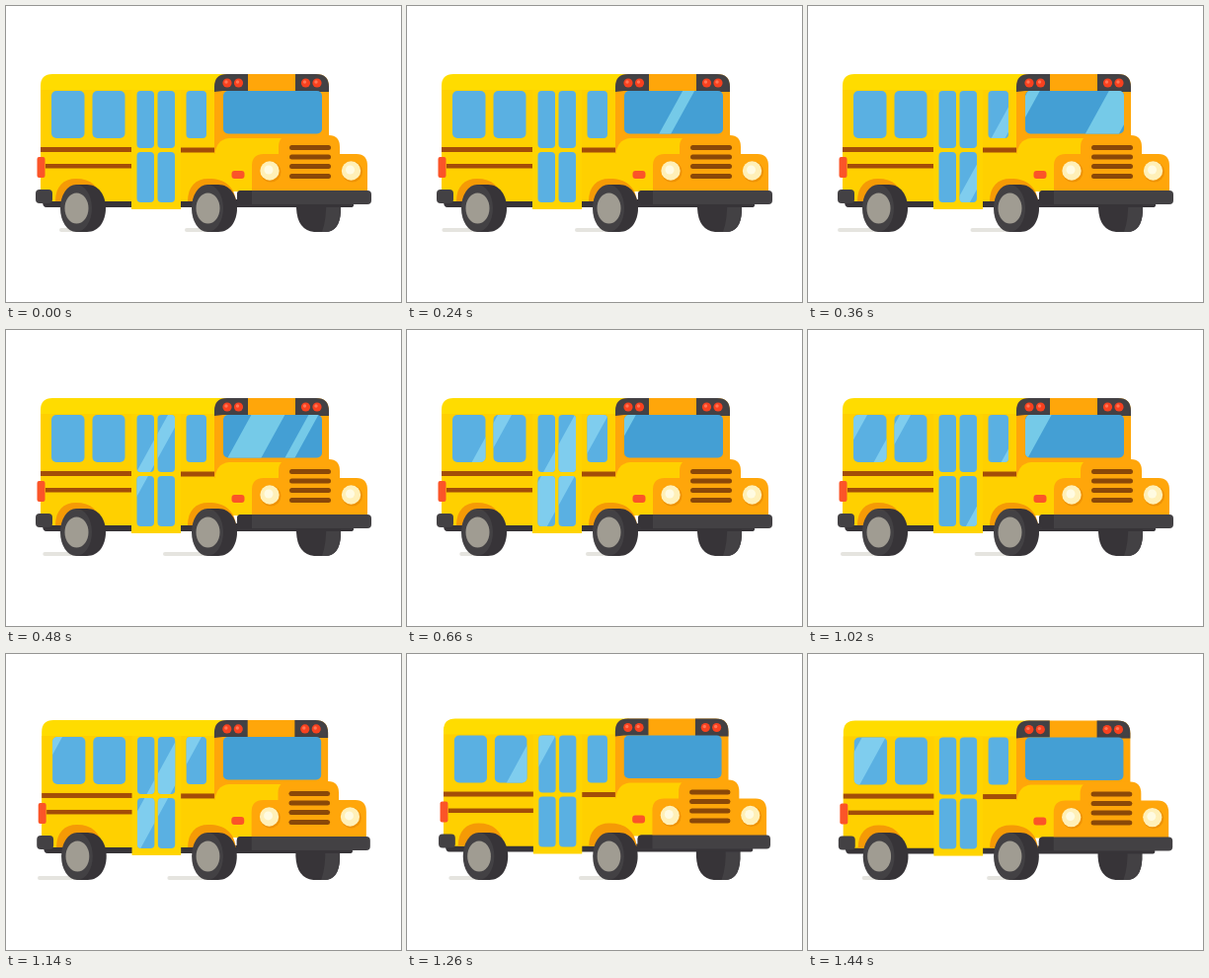
An HTML page for the animation above (1500 ms loop, 400 by 300 pixels).

```html
<!DOCTYPE html>
<html lang="en">
<head>
<meta charset="utf-8">
<title>School bus</title>
<style>
  html, body { margin: 0; width: 100%; height: 100%; overflow: hidden; background: #fff; }
  svg { display: block; width: 100%; height: 100%; }
  .dark { fill: #434144; }
  .deep { fill: #373438; }
  .brown { fill: #a34d08; }
  .red { fill: #f8411f; }
  .signal { fill: #fb5428; }
  .amber { fill: #ffa60a; }
  .shade { fill: #f59a06; }
  .pane { fill: #5ab0e2; }
  .streak { stroke: #e5e4df; stroke-width: 4; stroke-linecap: round; }
</style>
</head>
<body>
<svg viewBox="0 0 400 300">
  <defs>
    <g id="panes">
      <rect x="46" y="86" width="33.500" height="48" rx="5"/>
      <rect x="87.500" y="86" width="33" height="48" rx="5"/>
      <rect x="182.500" y="86" width="20.500" height="48" rx="4"/>
      <rect x="132.500" y="86" width="17.500" height="58" rx="4"/>
      <rect x="153.500" y="86" width="17.500" height="58" rx="4"/>
      <rect x="132.500" y="148" width="17.500" height="51" rx="4"/>
      <rect x="153.500" y="148" width="17.500" height="51" rx="4"/>
    </g>
    <rect id="screen" x="220" y="86" width="100" height="43.500" rx="5"/>
    <mask id="sideMask" maskUnits="userSpaceOnUse" x="0" y="0" width="400" height="300">
      <use href="#panes" fill="#fff"/>
    </mask>
    <mask id="frontMask" maskUnits="userSpaceOnUse" x="0" y="0" width="400" height="300">
      <use href="#screen" fill="#fff"/>
    </mask>
    <g id="wheel">
      <path class="deep" d="M71 181H82C94 181 101 192 101 205S94 229 82 229H71Z"/>
      <ellipse class="dark" cx="71" cy="205" rx="16" ry="24"/>
      <ellipse fill="#a09c92" cx="71.500" cy="205" rx="12" ry="15.500"/>
    </g>
    <g id="lamp">
      <circle r="4.600" class="red"/>
      <circle cx="-1" cy="-1" r="1.700" fill="#ff7656"/>
    </g>
    <g id="headlight">
      <circle cx="1" cy="1" r="10.500" fill="#ee9204"/>
      <circle r="9.700" fill="#fff0b8"/>
      <circle cx="-1" cy="-1" r="4.500" fill="#fffbe2"/>
    </g>
  </defs>

  <g id="bus">
    <path id="rearStreak" class="streak"/>
    <path id="midStreak" class="streak"/>
    <path class="deep" d="M294 195H339V208Q338 229 323 229H312Q295 227 294 205Z"/>
    <path class="dark" d="M324 195H339V208Q338 229 323 229H320Q325 215 324 195Z"/>

    <g id="body">
      <path class="deep" d="M37 196H352V202Q352 204 349 204H41Q37 204 37 198Z"/>
      <path fill="#ffdc00" d="M35 81Q35 69 47 69H225V198H35Z"/>
      <path fill="#ffd000" d="M35 85H212V198H35Z"/>
      <rect x="127" y="85" width="50" height="121" fill="#ffd400"/>
      <g class="brown">
        <rect x="35" y="143" width="92" height="5"/>
        <rect x="40" y="160" width="87" height="4.500"/>
        <rect x="177" y="143.500" width="35" height="5"/>
      </g>
      <path class="shade" d="M50 198C50 183 58 175 71 175C86 175 95 183 97 198Z"/>
      <use href="#panes" class="pane"/>
      <g mask="url(#sideMask)"><path id="sideGlare" fill="#7fcdee"/></g>

      <path class="amber" d="M211 82Q211 69 224 69H314Q327 69 327 82V150H211Z"/>
      <path class="dark" d="M211 87V82Q211 69 224 69H245V86H220ZM293 69H314Q327 69 327 82V87H293Z"/>
      <use href="#lamp" x="224" y="78"/>
      <use href="#lamp" x="235.500" y="78"/>
      <use href="#lamp" x="303.500" y="78"/>
      <use href="#lamp" x="315" y="78"/>
      <use href="#screen" fill="#449fd4"/>
      <g mask="url(#frontMask)"><path id="frontGlare" fill="#75cae8"/></g>
      <path fill="#ffd000" d="M211 154Q212 135 226 134H285V188H211Z"/>
      <path class="shade" d="M184 198C184 183 192 175 205 175C222 175 231 183 233 198Z"/>
      <path class="amber" d="M249 188V162Q249 150 261 150H276V143Q276 131 288 131H327Q338 131 338 143V150H355Q366 150 366 162V188Z"/>
      <g fill="#8a4808">
        <rect x="287" y="141" width="42" height="5" rx="2.500"/>
        <rect x="287" y="150.500" width="42" height="5" rx="2.500"/>
        <rect x="287" y="160" width="42" height="5" rx="2.500"/>
        <rect x="287" y="170" width="42" height="5" rx="2.500"/>
      </g>
      <use href="#headlight" x="267" y="167"/>
      <use href="#headlight" x="349.500" y="167"/>
      <rect x="228.500" y="167" width="13" height="8" rx="3" class="signal"/>
      <rect x="31.500" y="153" width="8" height="21" rx="2" class="signal"/>
      <rect x="30" y="186" width="17" height="14" rx="4" class="dark"/>
      <rect x="234" y="187" width="136" height="14" rx="4" class="dark"/>
      <path class="deep" d="M238 187H249V201H238Q234 201 234 197V191Q234 187 238 187Z"/>
    </g>

    <use href="#wheel"/>
    <use href="#wheel" x="133"/>
  </g>
</svg>
<script>
  const LOOP = 1500, STEP = 60, SLOPE = 0.55;
  // Light bands: left edge at the window top when the loop starts, and width.
  const SIDE = { speed: 0.4, bands: [[356, 14], [434, 34], [501, 11], [630, 24]] };
  const FRONT = { speed: 0.47, bands: [[392, 12], [474, 34], [532, 10], [702, 24]] };
  const set = (id, name, value) => document.getElementById(id).setAttribute(name, value);

  function glare({ speed, bands }, t) {
    return bands.map(([start, width]) => {
      const top = start - speed * t, bottom = top - SLOPE * 114;
      return `M${top} 86h${width}L${bottom + width} 200h${-width}Z`;
    }).join('');
  }

  function draw(t) {
    set('sideGlare', 'd', glare(SIDE, t));
    set('frontGlare', 'd', glare(FRONT, t));

    const hop = t > 1050 ? Math.sin(Math.PI * (t - 1050) / 450) : 0;
    set('body', 'transform', `translate(0 ${-3.5 * hop})`);
    set('bus', 'transform', `translate(202 0) scale(${1 - 0.012 * hop} 1) translate(-202 0)`);

    const p = t % 750;
    const rear = 56 - 24 * Math.sin(Math.PI * Math.min(p, 700) / 700) ** 2;
    const mid = 183 - 22 * (p <= 480 ? p / 480 : Math.max(0, 1 - (p - 480) / 45));
    set('rearStreak', 'd', `M${rear} 227H75`);
    set('midStreak', 'd', `M${mid} 227H208`);
  }

  function tick(now) {
    draw(Math.floor(now % LOOP / STEP) * STEP);
    requestAnimationFrame(tick);
  }
  draw(0);
  requestAnimationFrame(tick);
</script>
</body>
</html>
```
